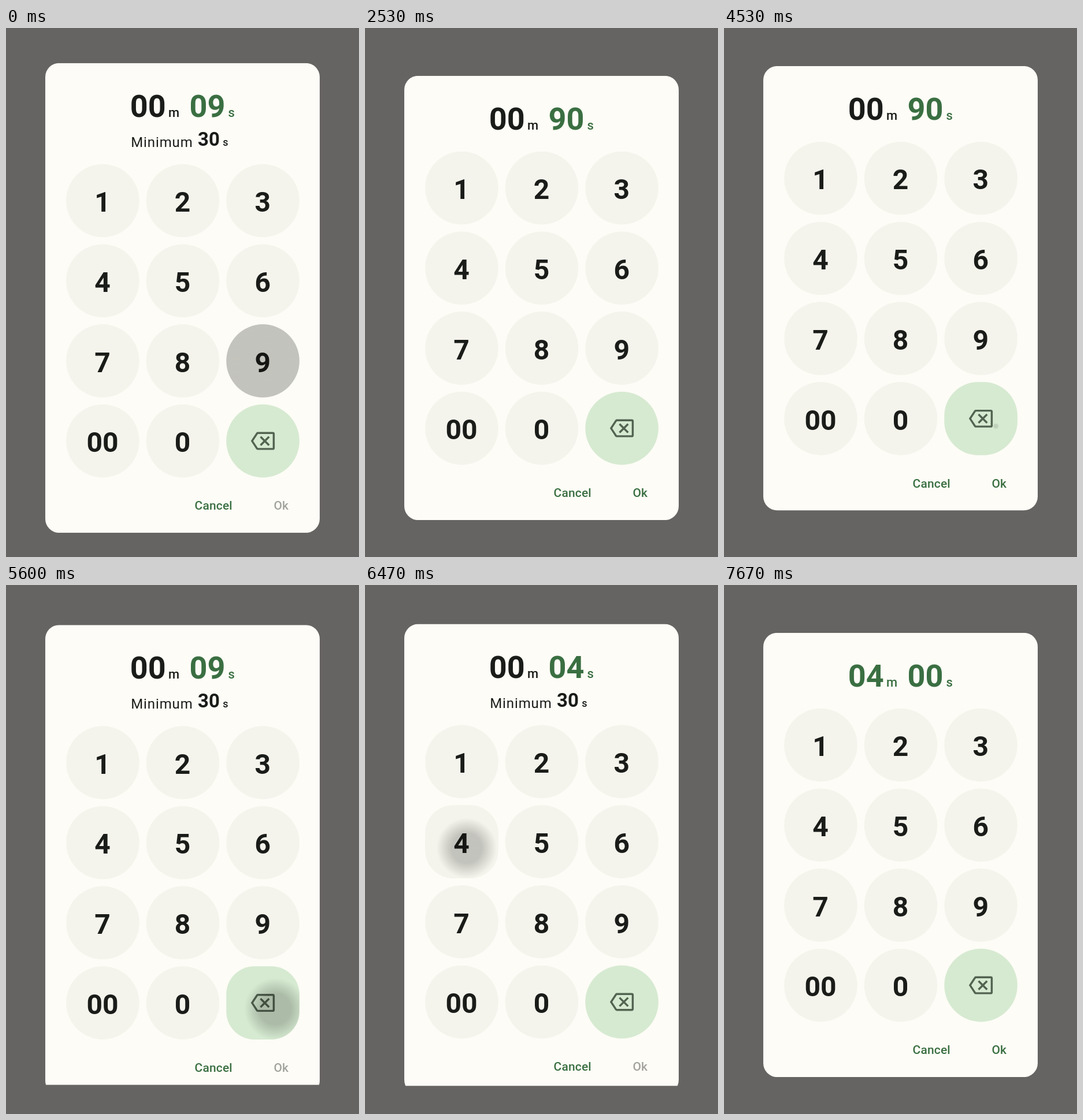
An HTML page for the animation above (7.74 s loop, 611 px wide and 916 px high).

```html
<!DOCTYPE html>
<html lang="en">
<head>
<meta charset="utf-8">
<title>Timer keypad</title>
<style>
  html, body { margin: 0; width: 100%; height: 100%; overflow: hidden; background: #666462; }
  svg { display: block; }
  text { font-family: Roboto, "Open Sans", sans-serif; fill: #1a1c19; }
  .mid { text-anchor: middle; }
  .big { font-size: 54px; font-weight: 700; }
  .unit { font-size: 22px; font-weight: 500; }
  .label { font-size: 24px; letter-spacing: .9px; }
  .limit { font-size: 33px; font-weight: 700; }
  .small { font-size: 18px; font-weight: 500; }
  .digit { font-size: 48px; font-weight: 700; }
  .action { font-size: 21px; font-weight: 500; letter-spacing: .15px; }
  .on { fill: #3a6f42; }
  .off { fill: #a3a39e; }
  .icon { fill: none; stroke: #526350; stroke-width: 2; }
</style>
</head>
<body>
<svg width="611" height="916" viewBox="0 0 611 916">
  <defs id="defs"></defs>
  <svg id="win" x="68" width="475" overflow="hidden">
    <rect id="card" width="475" rx="24" fill="#fdfcf6"/>
    <g transform="translate(-68 0)">
      <g id="mins">
        <text id="mm" class="mid big" x="245.8" y="93.2"></text>
        <text class="mid unit" x="290.5" y="93.2">m</text>
      </g>
      <g id="secs">
        <text id="ss" class="mid big" x="348.5" y="93.2"></text>
        <text class="mid unit" x="390.3" y="93.2">s</text>
      </g>
      <g id="min">
        <text class="label" x="216.2" y="145.2">Minimum</text>
        <text class="mid limit" x="351" y="143">30</text>
        <text class="mid small" x="379.8" y="143">s</text>
      </g>
      <g id="max">
        <text class="label" x="218" y="145.2">Maximum</text>
        <text class="mid limit" x="350" y="143">5</text>
        <text class="mid small" x="372" y="143">m</text>
      </g>
      <g id="pad">
        <text class="mid action on" x="359.2" y="729.8">Cancel</text>
        <text id="ok" class="mid action" x="476.3" y="729.8">Ok</text>
      </g>
    </g>
  </svg>
</svg>
<script>
const LOOP = 7740, TICK = 1000 / 15;
const SHORT = 769.4, TALL = 813.4, CENTER = 467.4;
const RADIUS = 63.3, DARK = 0.2, FADE = 375, RESIZE = 300;

// Entered digits, limit message and the moment each becomes active
const states = [
  { at: -1000, value: "0009", note: "min" },
  { at: 1010, value: "0090" },
  { at: 2610, value: "0900", note: "max" },
  { at: 4458, value: "0090" },
  { at: 5480, value: "0009", note: "min" },
  { at: 5700, value: "0000" },
  { at: 6335, value: "0004", note: "min" },
  { at: 6858, value: "0400" }
];

// Key presses: start of the ripple and start of its fade
const taps = [
  { key: "9", at: -500, out: 225 },
  { key: "0", at: 1030, out: 1540 },
  { key: "0", at: 2630, out: 3140 },
  { key: "back", at: 4500, out: 4900 },
  { key: "back", at: 5450, out: 5900 },
  { key: "back", at: 5640, out: 6050 },
  { key: "4", at: 6320, out: 6930 },
  { key: "00", at: 6890, out: 7290 }
];

const $ = id => document.getElementById(id);
const clamp = x => Math.min(1, Math.max(0, x));

function add(parent, tag, attrs, text) {
  const el = document.createElementNS("http://www.w3.org/2000/svg", tag);
  for (const name in attrs) el.setAttribute(name, attrs[name]);
  if (text) el.textContent = text;
  parent.appendChild(el);
  return el;
}

const box = { x: -RADIUS, y: -RADIUS, width: 2 * RADIUS, height: 2 * RADIUS, rx: RADIUS };
const keys = {};

["1", "2", "3", "4", "5", "6", "7", "8", "9", "00", "0", "back"].forEach((name, i) => {
  const x = 167.4 + (i % 3) * 138.6, y = 194.3 + Math.floor(i / 3) * 138.7;
  const g = add($("pad"), "g", { transform: `translate(${x} ${y})` });
  const back = name === "back";
  const shapes = [add(g, "rect", { ...box, fill: back ? "#d6ead1" : "#f4f4ec" })];
  if (back) {
    add(g, "path", {
      class: "icon", transform: "translate(-.1 0) scale(1.72) translate(-12 -12)",
      d: "M7 4Q6.5 4 6.2 4.4L1.2 12 6.2 19.6Q6.5 20 7 20H22Q23 20 23 19V5Q23 4 22 4Z" +
         "M9.7 7.7l8.6 8.6m0-8.6l-8.6 8.6"
    });
  } else {
    add(g, "text", { class: "mid digit", x: -.4, y: 19.2 }, name);
  }
  keys[name] = { g, shapes };
});

taps.forEach((tap, i) => {
  const id = "ripple" + i;
  tap.glow = add($("defs"), "radialGradient", { id, gradientUnits: "userSpaceOnUse" });
  add(tap.glow, "stop", { offset: .5 });
  add(tap.glow, "stop", { offset: 1, "stop-opacity": 0 });
  const key = keys[tap.key];
  tap.rect = add(key.g, "rect", { ...box, fill: `url(#${id})` });
  key.shapes.push(tap.rect);
});

// cubic-bezier(.4, 0, .2, 1)
function ease(x) {
  if (x <= 0 || x >= 1) return clamp(x);
  let lo = 0, hi = 1, u;
  for (let i = 0; i < 24; i++) {
    u = (lo + hi) / 2;
    const bx = 1.2 * u * (1 - u) ** 2 + .6 * u * u * (1 - u) + u ** 3;
    if (bx < x) lo = u; else hi = u;
  }
  return 3 * u * u * (1 - u) + u ** 3;
}

const heightOf = state => state.note ? TALL : SHORT;

function drawDialog(t) {
  const i = states.findLastIndex(s => s.at <= t);
  const now = states[i], from = heightOf(states[Math.max(0, i - 1)]), to = heightOf(now);
  const h = from + (to - from) * ease((t - now.at) / RESIZE);
  $("win").setAttribute("y", CENTER - h / 2);
  $("win").setAttribute("height", h);
  $("card").setAttribute("height", to);
  $("pad").setAttribute("transform", `translate(0 ${to - SHORT})`);

  const mm = now.value.slice(0, 2), ss = now.value.slice(2);
  $("mm").textContent = mm;
  $("ss").textContent = ss;
  for (const el of $("mins").children) el.classList.toggle("on", mm !== "00");
  for (const el of $("secs").children) el.classList.toggle("on", +now.value > 0);
  for (const id of ["min", "max"]) $(id).style.display = now.note === id ? "" : "none";
  const valid = !now.note && +now.value > 0;
  $("ok").classList.toggle("on", valid);
  $("ok").classList.toggle("off", !valid);
}

function drawRipples(t) {
  const squash = {};
  for (const { key, at, out, glow, rect } of taps) {
    const age = t - at;
    const alpha = DARK * clamp(age / 60) * (1 - clamp((t - out) / FADE));
    rect.setAttribute("opacity", alpha);
    if (age <= 0) continue;
    const drift = 1 - clamp((age - 120) / 170);
    glow.setAttribute("cx", (key === "back" ? 26 : 10) * drift);
    glow.setAttribute("cy", 13 * drift);
    glow.setAttribute("r", 54 * (age / 150) ** 1.5);
    if (age < 320) squash[key] = 15 * Math.sin(Math.PI * age / 320);
  }
  for (const name in keys)
    for (const shape of keys[name].shapes)
      shape.setAttribute("rx", RADIUS - (squash[name] || 0));
}

const start = performance.now();

function frame() {
  const t = (performance.now() - start) % LOOP;
  const step = Math.min(115, Math.floor((t + 5) / TICK)) * TICK;
  drawDialog(step);
  drawRipples(step);
  requestAnimationFrame(frame);
}
frame();
</script>
</body>
</html>
```
